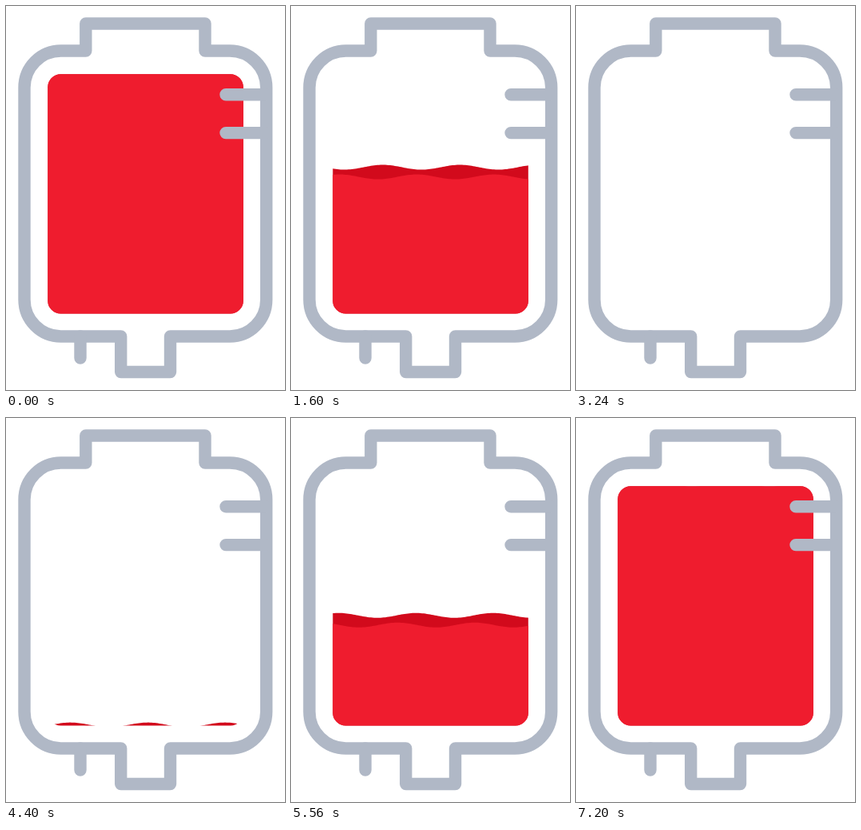
These frames come from a looping animation (349x480 px, 7.24 s). An HTML page:

```html
<!DOCTYPE html>
<html lang="en">
<head>
<meta charset="utf-8">
<title>Blood bag</title>
<style>
  html, body { margin: 0; height: 100%; overflow: hidden; background: #fff; }
  svg { display: block; width: 100vw; height: 100vh; }
</style>
</head>
<body>
<svg viewBox="0 0 349 480">
  <clipPath id="bag"><rect x="52.3" y="85.3" width="244.5" height="299.2" rx="16"/></clipPath>
  <g clip-path="url(#bag)">
    <path id="back" fill="#d20a1c"/>
    <path id="front" fill="#ef1c2e"/>
  </g>
  <g fill="none" stroke="#b0b8c6" stroke-width="15.4" stroke-linecap="round" stroke-linejoin="round">
    <path d="M99.8 56V22H249V56H280A45.7 46 0 0 1 325.7 102V367A45.7 46 0 0 1 280 413H205.5V457.5H143.7V413H68.7A45.7 46 0 0 1 23 367V102A45.7 46 0 0 1 68.7 56Z"/>
    <path d="M275 110.7H325M275 158.6H325M93 413V440"/>
  </g>
</svg>
<script>
const LOOP = 7240, EMPTY = 3750, PERIOD = 96.5, SWELL = 3;
const back = document.getElementById('back');
const front = document.getElementById('front');

// Surface height: eased fall while draining, eased rise while filling
function level(t) {
  const phase = t < EMPTY ? t - 1900 : 5600 - t;
  return 241.5 + 187 * Math.sin(phase * 7.2e-4);
}

// Filled area below a sine surface with a crest at x = crest
function wave(y, crest) {
  let d = 'M50 400';
  for (let x = 50; x <= 300; x += 2) {
    const h = y - SWELL * Math.cos((x - crest) * 2 * Math.PI / PERIOD);
    d += `L${x} ${h.toFixed(2)}`;
  }
  return d + 'L300 400Z';
}

function draw(t) {
  const y = level(t);
  back.setAttribute('d', wave(y, 115 - 0.1845 * (t - 1600)));
  front.setAttribute('d', wave(y + 12, 157 + 0.2133 * (t - 1600)));
}

const start = performance.now();
function frame(now) {
  draw(Math.max(0, now - start) % LOOP);
  requestAnimationFrame(frame);
}
draw(0);
requestAnimationFrame(frame);
</script>
</body>
</html>
```
